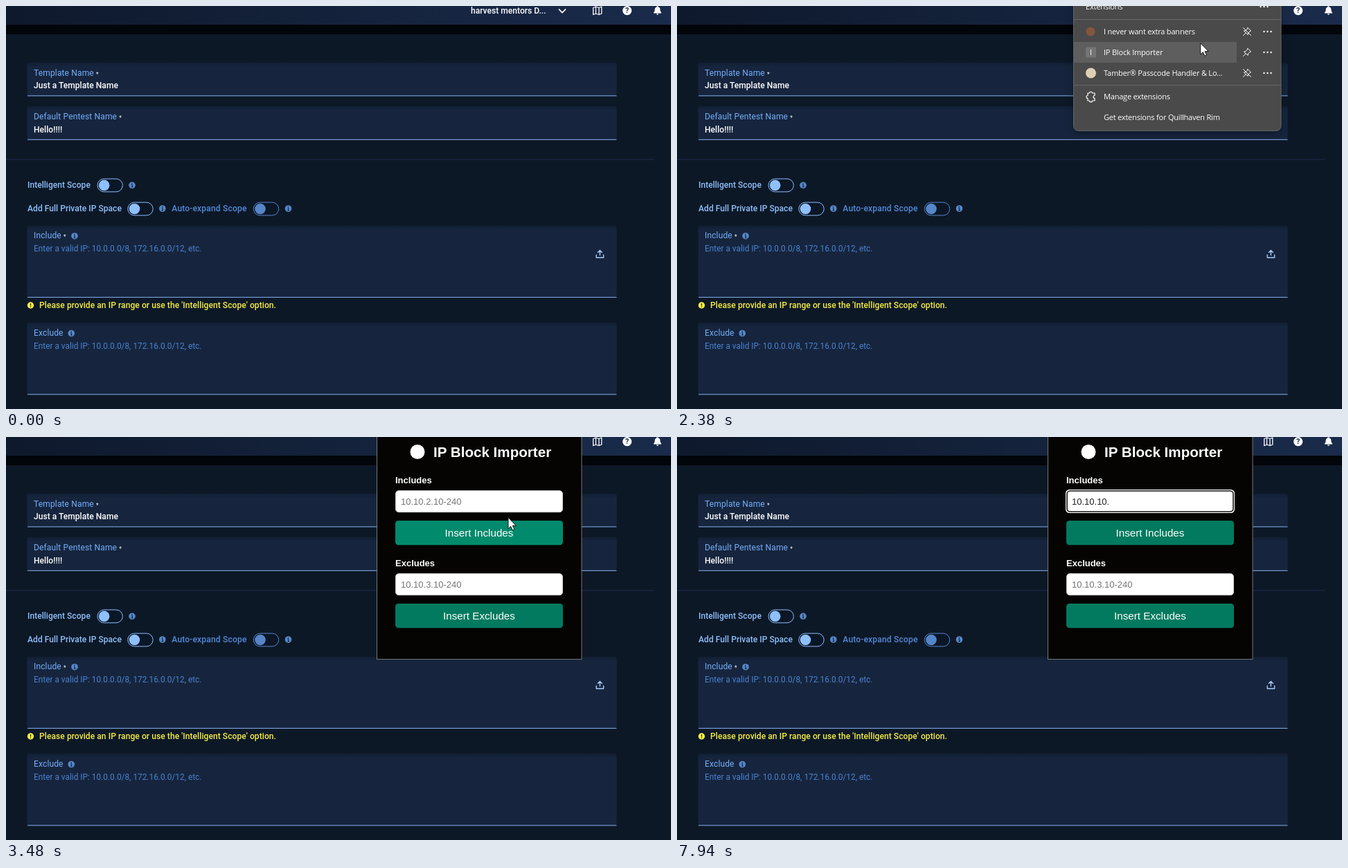
An HTML page for the animation above (8000 ms loop, 960x583 px).

```html
<!DOCTYPE html>
<html lang="en">
<head>
<meta charset="utf-8">
<title>Template form</title>
<style>
html, body { margin: 0; width: 100%; height: 100%; overflow: hidden; background: #0d1827; }
svg { display: block; width: 960px; height: 583px; }
text { white-space: pre; }
.page { font: 400 12.1px Roboto, sans-serif; fill: #73aefa; }
.page .label { letter-spacing: .1px; }
.page .mid { font-weight: 500; }
.page .pale { fill: #8fbff9; }
.page .dim { fill: #4a82d2; font-size: 11.87px; }
.page .white { fill: #fff; }
.page .star { fill: #fff; font-size: 8.5px; }
.page .warn { fill: #f4ee42; letter-spacing: .04px; }
.menu { font: 400 11px "Open Sans", sans-serif; letter-spacing: -.2px; fill: #fff; }
.popup { font: 400 13px "Liberation Sans", Arial, sans-serif; fill: #fff; }
.popup .bold { font-weight: 700; }
.popup .hint { fill: #757575; }
.popup .btn { font-size: 15.2px; text-anchor: middle; }
.line { fill: none; stroke: #fff; stroke-width: 1.3; stroke-linecap: round; stroke-linejoin: round; }
</style>
</head>
<body>
<svg viewBox="0 0 960 583" xmlns="http://www.w3.org/2000/svg">
  <defs>
    <linearGradient id="bar"><stop offset="0" stop-color="#0e192c"/><stop offset="1" stop-color="#1a2b4b"/></linearGradient>
    <linearGradient id="fade" x2="0" y2="1"><stop offset="0" stop-color="#111f34"/><stop offset="1" stop-color="#16253d"/></linearGradient>
    <filter id="shade" x="-15%" y="-15%" width="130%" height="130%" color-interpolation-filters="sRGB"><feDropShadow dx="0" dy="4" stdDeviation="5" flood-opacity=".3"/></filter>
    <g id="info">
      <circle r="4.8" fill="#5787c9"/>
      <path d="M-1-.6H.3V2.5M-1.2 2.5H1.4" fill="none" stroke="#0d1827"/>
      <rect x="-.7" y="-3" width="1.3" height="1.3" fill="#0d1827"/>
    </g>
    <g id="dots" fill="#fff"><circle cx="-5" r="1.2"/><circle r="1.2"/><circle cx="5" r="1.2"/></g>
    <path id="pin" class="line" style="stroke-width:1" d="M1-5.5L5.5-1L3.5 0L1.5 2L1 4.5L-4.5-1L-2-1.5L0-3.5ZM-2 2L-5.5 5.5"/>
    <g id="unpin"><use href="#pin"/><path class="line" style="stroke-width:1" d="M-5.5-5.5L5.5 5.5"/></g>
  </defs>

  <rect width="960" height="583" fill="#0d1827"/>
  <rect width="960" height="27" fill="url(#bar)"/>
  <rect y="27" width="960" height="14" fill="#02050a"/>

  <g class="page">
    <text class="mid white" x="671" y="11">harvest mentors D...</text>
    <path class="line" style="stroke-width:1.8" d="M798.5 5L803 9.7L807.5 5"/>
    <path class="line" d="M847.7 2.5L851.5 1L856 2.5L859.8 1V11L856 12.5L851.5 11L847.7 12.5ZM851.5 1V11M856 2.5V12.5"/>
    <circle cx="896.7" cy="6.6" r="6.6" fill="#fff"/>
    <text x="896.7" y="10.4" text-anchor="middle" style="font-weight:700;font-size:10.5px;fill:#17274a">?</text>
    <path class="white" d="M940.5.3C942 .3 941.7 1.3 942 1.6C944.3 2.4 944.4 4.6 944.5 7L946 9.6V10.4H935V9.6L936.5 7C936.6 4.6 936.7 2.4 939 1.6C939.3 1.3 939 .3 940.5.3ZM939 11.3H942A1.5 1.5 0 0 1 939 11.3Z"/>

    <g id="fields"></g>
    <text class="label" x="40" y="101">Template Name <tspan class="star" dy=".8">*</tspan></text>
    <text class="mid white" x="40" y="119.3">Just a Template Name</text>
    <text class="label" x="40" y="164.3">Default Pentest Name <tspan class="star" dy=".8">*</tspan></text>
    <text class="mid white" x="40" y="182.6">Hello!!!!</text>
    <path d="M0 222H935" stroke="#1c2d50"/>

    <text class="mid pale" x="31" y="263">Intelligent Scope</text>
    <text class="mid pale" x="31" y="297.3">Add Full Private IP Space</text>
    <text class="mid" style="fill:#5389d6;letter-spacing:.15px" x="239.3" y="297.3">Auto-expand Scope</text>
    <g id="toggles"></g>

    <text class="label" x="40" y="336.3">Include <tspan class="star" dy=".8">*</tspan></text>
    <text class="dim" x="40" y="355">Enter a valid IP: 10.0.0.0/8, 172.16.0.0/12, etc.</text>
    <path class="line" style="stroke:#a9cdfb;stroke-width:1.4" d="M857.4 360.5V354M854.4 356.6L857.4 353.6L860.4 356.6M852.2 360V364H862.6V360"/>
    <circle class="warn" cx="35.5" cy="433" r="4.7"/>
    <path d="M35.5 430.3V433.4M35.5 434.6V435.8" stroke="#0d1827" stroke-width="1.2"/>
    <text class="mid warn" x="48" y="437.2">Please provide an IP range or use the 'Intelligent Scope' option.</text>
    <text class="label" x="40" y="477">Exclude</text>
    <text class="dim" x="40" y="495.5">Enter a valid IP: 10.0.0.0/8, 172.16.0.0/12, etc.</text>
    <use href="#info" x="182" y="259.3"/>
    <use href="#info" x="225.8" y="293"/>
    <use href="#info" x="407.5" y="293"/>
    <use href="#info" x="99" y="332.7"/>
    <use href="#info" x="94.3" y="473.5"/>
  </g>

  <g id="menu" class="menu">
    <rect x="572.5" y="-20" width="299.5" height="200.5" rx="7" fill="#4a4a4a" stroke="#666" filter="url(#shade)"/>
    <rect id="row" x="573" width="235" height="30" fill="#5e5e5e"/>
    <path d="M573 19.5H872M573 114.5H872" stroke="#676767"/>
    <text x="590" y="4.5">Extensions</text>
    <use href="#dots" x="847.5" y="1"/>
    <circle cx="597" cy="37" r="6.5" fill="#84563d"/>
    <text x="616" y="41">I never want extra banners</text>
    <rect x="590" y="59.5" width="15" height="15" rx="1.5" fill="#747474"/>
    <text x="597.5" y="71" text-anchor="middle">I</text>
    <text x="616" y="71">IP Block Importer</text>
    <circle cx="597.5" cy="97" r="7.5" fill="#dccfb4"/>
    <text x="616" y="101">Tamber® Passcode Handler &amp; Lo...</text>
    <use href="#unpin" x="823" y="37"/><use href="#dots" x="852.5" y="37"/>
    <use href="#pin" x="823" y="67"/><use href="#dots" x="852.5" y="67"/>
    <use href="#unpin" x="823" y="97"/><use href="#dots" x="852.5" y="97"/>
    <path class="line" style="stroke-width:1.2" d="M593 126H595.5A2 2 0 0 1 599.5 126H603V129.5A2 2 0 0 0 603 133.5V137H599.5A2 2 0 0 1 595.5 137H593V133.5A2 2 0 0 1 593 129.5Z"/>
    <text x="616" y="135">Manage extensions</text>
    <text x="616" y="165">Get extensions for Quillhaven Rim</text>
  </g>

  <g id="popup" class="popup">
    <rect x="535.5" y="-20" width="295.5" height="341.5" fill="#050403" stroke="#777"/>
    <circle cx="594" cy="21.5" r="10.5"/>
    <text class="bold" style="font-size:20.6px" x="617" y="29">IP Block Importer</text>
    <text class="bold" x="562" y="67">Includes</text>
    <rect id="ring" x="561" y="76" width="244" height="34" rx="5.5"/>
    <rect id="box"/>
    <text id="typed" x="570" y="98"></text>
    <rect id="caret" y="86" width="1" height="15" fill="#000"/>
    <rect id="add" x="562" y="121" width="242" height="35.3" rx="4.5"/>
    <text class="btn" x="683" y="143.6">Insert Includes</text>
    <text class="bold" x="562" y="187">Excludes</text>
    <rect x="562.5" y="197.7" width="241" height="31" rx="4.5" stroke="#ccc"/>
    <text class="hint" x="570" y="218">10.10.3.10-240</text>
    <rect x="562" y="241" width="242" height="35.3" rx="4.5" fill="#027a5f"/>
    <text class="btn" x="683" y="263.6">Insert Excludes</text>
  </g>

  <path id="arrow" d="M0 0V16.2L3.7 12.8L6.2 18.4L8.8 17.3L6.4 11.8H11.5Z" fill="#fff" stroke="#000" stroke-width=".9"/>
  <path id="beam" class="line" style="stroke-width:1" d="M-3-8H3M0-8V8M-3 8H3"/>
</svg>
<script>
const LOOP = 8000, FRAME = 69;
const $ = id => document.getElementById(id);
const set = (id, attrs) => { for (const k in attrs) $(id).setAttribute(k, attrs[k]); };
const show = (id, on) => set(id, { visibility: on ? 'visible' : 'hidden' });

$('fields').innerHTML = [[82, 130], [145, 193.4], [318, 421.5], [458, 562]].map(([top, end]) =>
  `<rect x="30.5" y="${top}" width="851" height="${end - top}" rx="4" fill="#16253d"/>
   <rect x="30.5" y="${top}" width="851" height="6" rx="3" fill="url(#fade)"/>
   <path d="M31 ${end - .1}H881.5" stroke="#86b3ee"/>`).join('');

$('toggles').innerHTML = [[132, 259.4, '#8ec0ff'], [175.8, 293.5, '#8ec0ff'], [357.3, 293.5, '#5685c8']].map(([x, y, c]) =>
  `<rect x="${x}" y="${y - 9.4}" width="36.4" height="18.8" rx="9.4" fill="#0b1626" stroke="${c}"/>
   <circle cx="${x + 9.7}" cy="${y}" r="7.8" fill="${c}"/>`).join('');

// pointer passes: each is a list of [time, x, y]
const arrowRuns = [
  [[360, 934, 524], [700, 905, 220], [980, 848, -22]],
  [[1780, 850, -24], [2050, 800, 20], [2400, 745, 62], [2800, 745, 62]],
  [[2800, 745, 62], [3340, 763, 198], [3410, 748, 160]],
  [[3410, 748, 160], [3479, 725, 116.5], [3548, 724, 108]],
];
const beamRuns = [[[3548, 723, 104], [3700, 718, 80], [3880, 712, 93], [LOOP, 712, 93]]];

function along(runs, t) {
  const run = runs.find(r => t >= r[0][0] && t < r[r.length - 1][0]);
  if (!run) return null;
  const start = run[0][0];
  const q = start + Math.floor((t - start) / FRAME) * FRAME;
  const i = run.findIndex((p, n) => n && q < p[0]);
  const a = run[i - 1], b = run[i];
  const k = (q - a[0]) / (b[0] - a[0]);
  return [a[1] + (b[1] - a[1]) * k, a[2] + (b[2] - a[2]) * k];
}

function place(id, p) {
  show(id, p);
  if (p) set(id, { transform: `translate(${p[0]} ${p[1]})` });
}

const entry = '10.10.10.';
const keys = [5260, 5460, 5730, 6000, 6200, 6400, 6660, 7060, 7390];
const focusAt = 3880;

function caretOn(t, count) {
  if (count) return t - keys[count - 1] < 550;
  return t >= focusAt && (t < 4380 || t >= 4860);
}

function draw(t) {
  const tip = along(arrowRuns, t);
  const menuOpen = t >= 1710 && t < 2600, popupOpen = t >= 2800;
  show('menu', menuOpen);
  show('popup', popupOpen);
  place('arrow', tip);
  place('beam', along(beamRuns, t));

  set('row', { y: menuOpen && tip && tip[1] > 52 ? 52 : 22.5 });
  const hover = popupOpen && tip && tip[1] > 114 && tip[1] < 157;
  set('add', { fill: hover ? '#028a6c' : '#027a5f' });

  const focused = t >= focusAt;
  set('ring', { opacity: focused ? 1 : 0 });
  set('box', focused ? { stroke: '#101010', 'stroke-width': 1.6, x: 563, y: 78, width: 240, height: 30, rx: 4.5 }
                     : { stroke: '#ccc', 'stroke-width': 1, x: 562.5, y: 77.7, width: 241, height: 31, rx: 4.5 });

  const count = keys.filter(k => t >= k).length;
  const text = entry.slice(0, count);
  $('typed').textContent = text || '10.10.2.10-240';
  set('typed', { fill: count ? '#222' : '#757575' });
  const wide = [...text].reduce((w, c) => w + (c === '.' ? 3.61 : 7.23), 0);
  set('caret', { x: Math.round(570 + wide), opacity: popupOpen && caretOn(t, count) ? 1 : 0 });
}

function tick() {
  draw(performance.now() % LOOP);
  requestAnimationFrame(tick);
}
tick();
</script>
</body>
</html>
```
